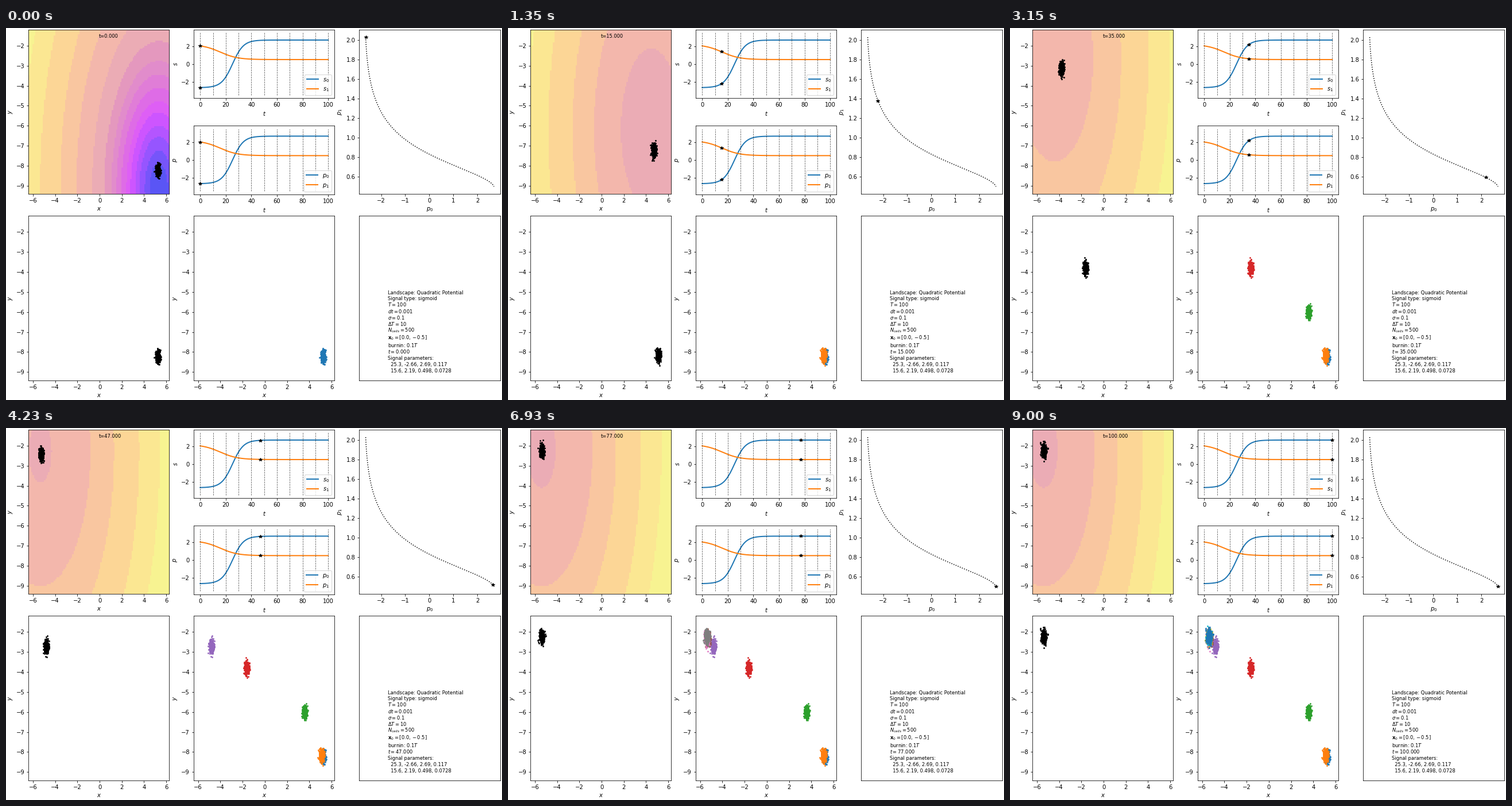
Recreate the animation shown at these times as a matplotlib script. Size 864 by 648 pixels, loop 9090 ms.

```python
import numpy as np
import matplotlib.pyplot as plt
from matplotlib.animation import FuncAnimation

W, H, DPI = 864, 648, 72
T, STEP, N_CELLS, SIGMA = 100, 10, 500, 0.1
X0 = np.array([0.0, -0.5])
TAU = np.array([2.0, 4.5])  # relaxation times of x²/4 + y²/9
XLIM, YLIM = (-6.39, 6.27), (-9.42, -1.2)

# Panel edges in pixels from the top left corner
LEFT, MIDDLE, RIGHT = (39.3, 284.4), (327.1, 572.3), (615.4, 861)
TOP, BOTTOM = (3, 289.4), (327.4, 613.9)

# Upper edges of the height bands and their colours, from the valley up
BOUNDS = np.array([1.18, 1.4, 1.75, 2.1, 2.6, 3.1, 3.8, 4.6, 5.5, 7.0,
                   9.9, 14.65, 20.5, 29.3, 38.3]) - 17.3
BANDS = np.array([
    (90, 85, 245), (118, 85, 250), (150, 85, 255), (180, 85, 255),
    (205, 85, 255), (222, 95, 245), (222, 108, 230), (224, 125, 215),
    (225, 140, 203), (228, 152, 190), (235, 172, 181), (243, 183, 172),
    (249, 198, 160), (252, 214, 150), (251, 231, 146), (247, 243, 145),
], dtype=np.uint8)

# Each line with its distance in pixels to the baseline of the next one
INFO = [
    ("Landscape: Quadratic Potential", 10.5),
    ("Signal type: sigmoid", 10.5),
    ("$T=100$", 12),
    ("$dt=0.001$", 11),
    (r"$\sigma=0.1$", 11),
    (r"$\Delta T=10$", 11),
    ("$N_{cells}=500$", 13),
    (r"$\mathbf{x}_0=[0.0, -0.5]$", 13),
    ("burnin: $0.1T$", 11),
    ("$t=%.3f$", 11),
    ("Signal parameters:", 11),
    ("  25.3, -2.66, 2.69, 0.117", 11),
    ("  15.6, 2.19, 0.498, 0.0728", 0),
]


def sigmoid(t, mid, start, end, rate):
    return 0.5 * ((end - start) * np.tanh(rate * (t - mid)) + start + end)


def signal(t):
    return np.array([sigmoid(t, 25.3, -2.66, 2.69, 0.117),
                     sigmoid(t, 15.6, 2.19, 0.498, 0.0728)])


def simulate():
    """Cell positions at every whole time step, after the burn-in."""
    rng = np.random.default_rng(7)
    goal = -TAU * signal(0)
    mean = goal + (X0 - goal) * np.exp(-0.1 * T / TAU)
    decay = np.exp(-1 / TAU)
    spread = SIGMA * np.sqrt(TAU / 2)
    offset = rng.normal(size=(N_CELLS, 2)) * spread
    clouds = [mean + offset]
    substeps = 100
    for n in range(T):
        for k in range(substeps):
            p = signal(n + (k + 0.5) / substeps)
            mean = mean - (mean / TAU + p) / substeps
        kick = rng.normal(size=offset.shape) * spread * np.sqrt(1 - decay**2)
        offset = offset * decay + kick
        clouds.append(mean + offset)
    return clouds


def centres(lo, hi, n=100):
    return lo + (np.arange(n) + 0.5) * (hi - lo) / n


GX, GY = np.meshgrid(centres(*XLIM), centres(*YLIM))


def landscape(t):
    p0, p1 = signal(t)
    phi = GX**2 / 4 + GY**2 / 9 + p0 * GX + p1 * GY
    return BANDS[np.digitize(phi, BOUNDS)]


fig = plt.figure(figsize=(W / DPI, H / DPI), dpi=DPI, facecolor="white")


def panel(column, row, xlabel="", ylabel=""):
    (x0, x1), (y0, y1) = column, row
    ax = fig.add_axes([x0 / W, 1 - y1 / H, (x1 - x0) / W, (y1 - y0) / H])
    ax.set_xlabel(xlabel)
    ax.set_ylabel(ylabel)
    return ax


def plane(column, row):
    ax = panel(column, row, "$x$", "$y$")
    ax.set(xlim=XLIM, ylim=YLIM, xticks=range(-6, 7, 2), yticks=range(-9, -1))
    return ax


def dots(ax, color="k"):
    return ax.plot([], [], "o", ms=2, mew=1, color=color, alpha=0.85)[0]


def star(ax):
    return ax.plot([], [], "k*", ms=6)[0]


def time_panel(row, name):
    ax = panel(MIDDLE, row, "$t$", f"${name}$")
    for i in range(2):
        ax.plot(times, curve[i], lw=2, label=f"${name}_{i}$")
    ax.vlines(range(0, T + 1, STEP), -3.5, 3.5, colors="k", linestyles="--",
              lw=0.8, alpha=0.65)
    ax.set(xticks=range(0, 101, 20), yticks=(-2, 0, 2))
    ax.legend(loc="lower right")
    return [star(ax), star(ax)]


def note_lines(ax):
    """Stack the lines upwards from the last one; return the artists."""
    x0, y = RIGHT[0] + 0.2 * (RIGHT[1] - RIGHT[0]), BOTTOM[1] - 14.3
    lines = []
    for words, gap in reversed(INFO):
        y -= gap
        lines.append(fig.text(x0 / W, 1 - y / H, words, fontsize="small"))
    return lines[::-1]


clouds = simulate()
times = np.linspace(0, T, 1001)
curve = signal(times)

top = plane(LEFT, TOP)
image = top.imshow(landscape(0), extent=XLIM + YLIM, origin="lower",
                   aspect="auto", interpolation="nearest")
live = dots(top)
clock = top.text(0.5, 0.95, "", transform=top.transAxes, fontsize="small")

signal_stars = time_panel((3, 122.4), "s") + time_panel((170.4, 289.7), "p")

phase = panel(RIGHT, TOP, "$p_0$", "$p_1$")
phase.plot(*curve, "k:")
phase.set(xticks=range(-2, 3), yticks=np.arange(0.6, 2.1, 0.2))
phase.autoscale(False)
phase_star = star(phase)

snapshot = dots(plane(LEFT, BOTTOM))
history_ax = plane(MIDDLE, BOTTOM)
history = [dots(history_ax, f"C{i % 10}") for i in range(T // STEP + 1)]

notes = panel(RIGHT, BOTTOM)
notes.set(xticks=[], yticks=[])
time_note = next(line for line in note_lines(notes) if "%" in line.get_text())
time_format = time_note.get_text()


def update(t):
    p = signal(t)
    image.set_data(landscape(t))
    live.set_data(*clouds[t].T)
    clock.set_text(f"t={t:.3f}")
    time_note.set_text(time_format % t)
    for i, mark in enumerate(signal_stars):
        mark.set_data([t], [p[i % 2]])
    phase_star.set_data([p[0]], [p[1]])
    last = t // STEP
    snapshot.set_data(*clouds[last * STEP].T)
    for i, cells in enumerate(history):
        cells.set_data(*(clouds[i * STEP].T if i <= last else ([], [])))
    return []


anim = FuncAnimation(fig, update, frames=T + 1, interval=90,
                     init_func=lambda: update(0), repeat=True, repeat_delay=0)
plt.show()
```
